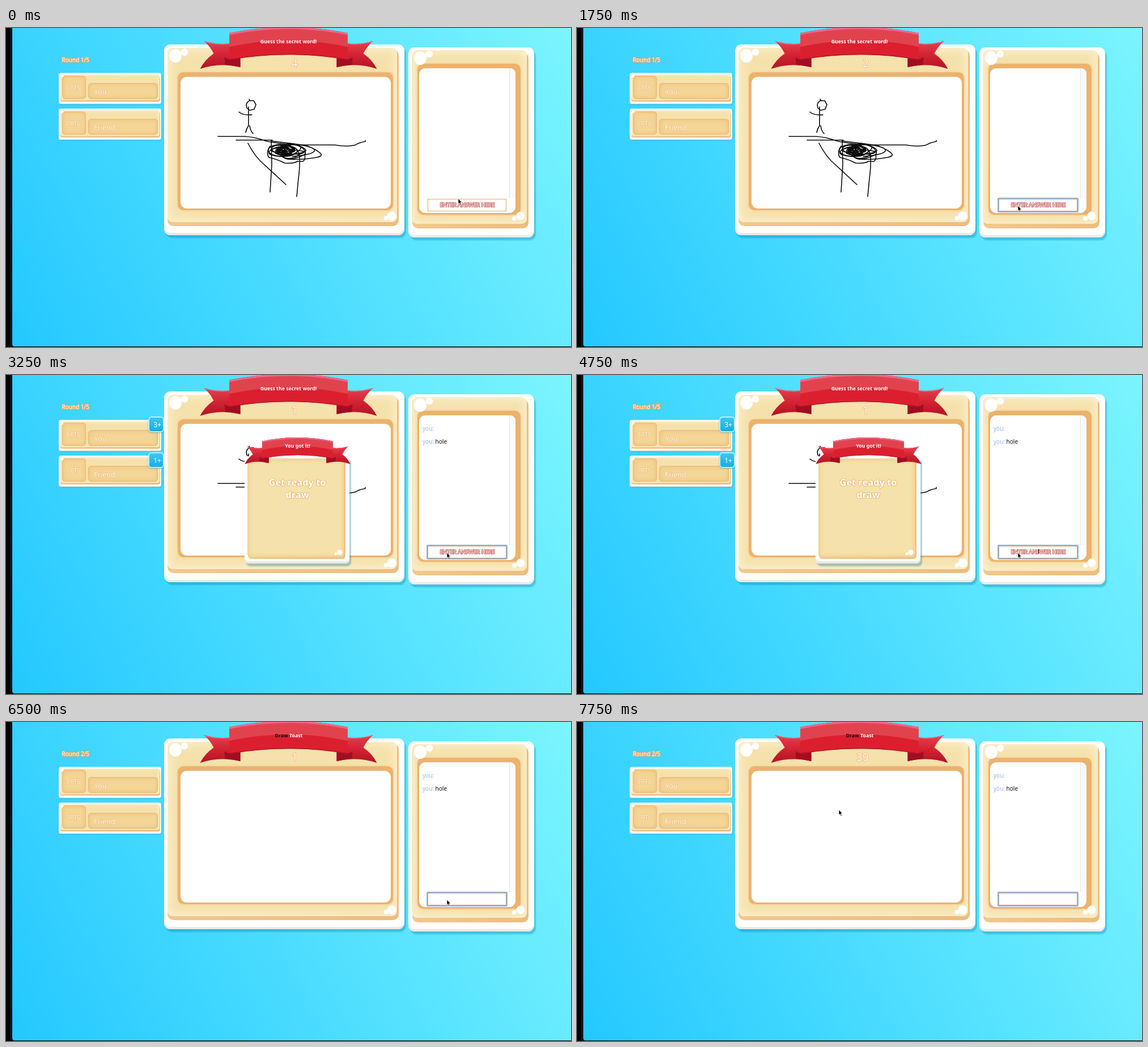
An HTML page for the animation above (8000 ms loop, 997 by 562 pixels).

```html
<!DOCTYPE html>
<html lang="en">
<head>
<meta charset="utf-8">
<title>Drawing game</title>
<style>
html, body { margin: 0; width: 100%; height: 100%; overflow: hidden; }
#stage { position: relative; width: 997px; height: 562px; overflow: hidden; background: #050505; }
#stage div, #stage svg { position: absolute; box-sizing: border-box; }
svg { inset: 0; width: 997px; height: 562px; }
.sky { left: 11px; top: 0; width: 986px; height: 561px; border-radius: 0 0 0 4px;
  background: linear-gradient(62deg, #24c8ff, #50dfff 50%, #7bf5ff); }
.edge { left: 8px; top: 0; width: 2px; height: 561px; background: #1d1d1d; }
.panel { background: #fff; border-radius: 11px;
  box-shadow: inset 0 -4px 0 #eae9e6, 3px 5px 2px #0a78a055; }
.base { background: linear-gradient(90deg, #f1c88d, #edbd7e); border-radius: 10px; }
.face { background: #f5e1ab; border-radius: 9px; box-shadow: inset 0 0 16px 4px #fbf0d0; }
.frame { background: #edb26c; border-radius: 10px; box-shadow: 0 0 3px #f0c78a; }
.sheet { background: #fff; border-radius: 11px; }
.card { left: 93px; width: 181px; height: 55px; background: #fff; border-radius: 4px;
  box-shadow: inset 0 -2px 0 #eeece6, 1px 1px 2px #0a78a055; }
.card .base { left: 3px; top: 6px; width: 176px; height: 45px; border-radius: 4px; }
.card .face { left: 3px; top: 3px; width: 175px; height: 45px; border-radius: 4px;
  box-shadow: inset 0 0 5px 1px #fbf0d0; }
.slot { background: #f3d596; border: 1.5px solid #ebb877; border-radius: 5px;
  box-shadow: inset 0 0 7px #eeb973; }
.scroll { left: 888px; top: 71px; width: 11px; height: 229px; background: #fafafa;
  border-left: 1px solid #e6e6e6; border-radius: 0 9px 0 0; }
.field { left: 744px; top: 300.5px; width: 139px; height: 22px; background: #fff;
  border: 1.5px solid #eda960; }
.ring { left: 744px; top: 300.5px; width: 139px; height: 22px; border: 1.5px solid #c7a078;
  box-shadow: 0 0 0 1.5px #86aedc, 0 0 3px 1px #86aedc; }
.badge { left: 251px; width: 28px; height: 28px; border-radius: 6px; border: 2px solid #b6f0ff;
  background: linear-gradient(#3cc8f3, #18aee2); box-shadow: 0 1px 2px #0a78a077; }
text { font-family: "Noto Sans", "Open Sans", sans-serif; fill: #fff; white-space: pre; }
.mid { text-anchor: middle; }
.title { font-size: 8.8px; font-weight: 700; text-anchor: middle; }
.glow { stroke: #f0ad66; stroke-width: 1.6px; paint-order: stroke; stroke-linejoin: round; }
.soft { stroke-width: 1.1px; }
.round { font-size: 10px; font-weight: 500; stroke-width: 2.2px; stroke: #f5a55c; }
.pts { font-size: 10.2px; text-anchor: middle; }
.name { font-size: 12.6px; }
.clock { font-size: 19px; text-anchor: end; }
.ready { font-size: 16.4px; font-weight: 600; text-anchor: middle; }
.chat { font-size: 10px; fill: #111; }
.who { fill: #8fb6e6; }
.hint { font-size: 9.6px; text-anchor: middle; stroke: #c2484c; stroke-width: 1.5px; paint-order: stroke; }
.typed { font-size: 9.6px; text-anchor: middle; fill: #111; }
.plus { font-size: 12px; text-anchor: middle; }
.ink { fill: none; stroke: #0a0a0a; stroke-width: 1.6; stroke-linecap: round; stroke-linejoin: round; }
</style>
</head>
<body>
<div id="stage">
  <div class="edge"></div>
  <div class="sky"></div>

  <div class="card" style="top:79px">
    <div class="base"></div><div class="face"></div>
    <div class="slot" style="left:6px;top:5px;width:42px;height:41px"></div>
    <div class="slot" style="left:52px;top:18px;width:123px;height:28px"></div>
  </div>
  <div class="card" style="top:142px">
    <div class="base"></div><div class="face"></div>
    <div class="slot" style="left:6px;top:5px;width:42px;height:41px"></div>
    <div class="slot" style="left:52px;top:18px;width:123px;height:28px"></div>
  </div>
  <div class="badge" style="top:73px" data-on="3250-5750"></div>
  <div class="badge" style="top:136px" data-on="3250-5750"></div>

  <div class="panel" style="left:279px;top:29px;width:424px;height:336px"></div>
  <div class="base" style="left:285px;top:38px;width:408px;height:311px"></div>
  <div class="face" style="left:285px;top:35px;width:405px;height:307px"></div>
  <div class="frame" style="left:303px;top:78px;width:380px;height:243px"></div>
  <div class="sheet" style="left:307.5px;top:86px;width:371px;height:232px"></div>

  <div class="panel" style="left:710px;top:34px;width:222px;height:335px"></div>
  <div class="base" style="left:717px;top:43px;width:205px;height:310px"></div>
  <div class="face" style="left:716px;top:39px;width:203px;height:306px"></div>
  <div class="frame" style="left:726px;top:62.5px;width:182px;height:266.5px"></div>
  <div class="sheet" style="left:729px;top:71px;width:170px;height:255px"></div>
  <div class="scroll"></div>
  <div class="field"></div>
  <div class="ring" data-on="1250-8000"></div>

  <svg viewBox="0 0 997 562">
    <defs>
      <linearGradient id="tail" x2="0" y2="1">
        <stop offset="0" stop-color="#e5404f"/>
        <stop offset=".5" stop-color="#d32333"/>
        <stop offset="1" stop-color="#b01425"/>
      </linearGradient>
      <g id="side">
        <path fill="url(#tail)" d="M-149 23Q-126 30-103 27V53H-85V69Q-122 60-156 72Q-148 56-132 45Q-138 33-149 23Z"/>
        <path fill="none" stroke="#ee6480" stroke-width="1.5" d="M-149 23.5Q-126 30.5-103 27.5"/>
        <path fill="#a10e21" d="M-113 51Q-109 55-104 55L-85 52V69Q-98 66-112 65Z"/>
      </g>
      <g id="ribbon">
        <use href="#side"/>
        <use href="#side" transform="scale(-1 1)"/>
        <path fill="#dc1f2f" d="M-104.500 9Q0-12 104.500 9V56Q0 38-104.500 56Z"/>
        <path fill="#e1434e" d="M-104.500 9Q0-12 104.500 9V33Q0 11-104.500 33Z"/>
        <path fill="none" stroke="#f0668c" stroke-width="3.500" d="M-104.500 10.500Q0-10.500 104.500 10.500"/>
        <path fill="none" stroke="#b81526" stroke-width="1.500" d="M-104.500 55.500Q0 37.500 104.500 55.500"/>
      </g>
    </defs>

    <g fill="#fff">
      <ellipse cx="299" cy="49" rx="11" ry="12"/><circle cx="315" cy="42.500" r="6.200"/>
      <circle cx="680.500" cy="331" r="8"/><circle cx="670.500" cy="335" r="4"/>
      <ellipse cx="731" cy="53" rx="11" ry="12"/><circle cx="747" cy="46" r="6.200"/>
      <circle cx="908" cy="331" r="7.500"/><circle cx="897" cy="335.500" r="4"/>
      <circle cx="98" cy="84" r="3.500"/><circle cx="98" cy="147" r="3.500"/>
    </g>

    <g class="ink" data-on="0-6500">
      <path d="M429 125.500l2 3M425 132l4-4h8l4 7-3 8-8 2-5-4-1-6 2-4"/>
      <path d="M428 139V172Q424 178 423 184M430 172Q431 181 436 186M411 148Q418 154 434 153"/>
      <path d="M374 191H421Q440 192 458 199Q480 204 515 206H580Q603 210 617 206Q622 202 634 200V198M406 197.500H470"/>
      <path d="M427 203Q440 228 455 240L494 276M468 198L469 240 466 289M518 222Q519 245 516 265L513 297"/>
      <path d="M468 199Q500 203 530 207Q550 215 556 222Q558 226 548 228Q520 233 500 231M518 206Q547 210 544 217Q538 224 505 226"/>
      <path d="M466 208Q458 220 464 228Q478 231 492 238Q508 239 514 235H524Q529 231 527 223"/>
      <path id="scribble"/>
    </g>

    <use href="#ribbon" x="498.500"/>
    <text class="title" x="498.500" y="26.500" data-on="0-6500">Guess the secret word!</text>
    <text class="title" x="499" y="26.500" data-on="6500-8000"><tspan fill="#111">Draw</tspan> Toast</text>

    <g class="clock glow">
      <text x="514.500" y="69" data-on="0-750">4</text>
      <text x="514.500" y="69" data-on="750-1750">3</text>
      <text x="514.500" y="69" data-on="1750-2750">2</text>
      <text x="514.500" y="69" data-on="2750-7500">1</text>
      <text x="514.500" y="69" data-on="7500-8000">39</text>
    </g>

    <text class="glow round" x="98.500" y="60" data-on="0-6500">Round 1/5</text>
    <text class="glow round" x="98.500" y="60" data-on="6500-8000">Round 2/5</text>
    <g class="glow soft">
      <text class="pts" x="118" y="109" data-on="0-3250">0 PTS</text>
      <text class="pts" x="118" y="109" data-on="3250-8000">3 PTS</text>
      <text class="pts" x="118" y="172" data-on="0-3250">0 PTS</text>
      <text class="pts" x="118" y="172" data-on="3250-8000">1 PTS</text>
      <text class="name" x="155.500" y="117">You</text>
      <text class="name" x="155" y="180">Friend</text>
    </g>
    <g class="plus" data-on="3250-5750">
      <text x="267" y="91.500">3+</text>
      <text x="267" y="154.500">1+</text>
    </g>

    <g data-on="3250-8000">
      <text class="chat" x="735" y="97.500"><tspan class="who">you:</tspan></text>
      <text class="chat" x="735" y="120.500"><tspan class="who">you:</tspan> hole</text>
    </g>
    <text class="hint" x="814" y="314.500" data-on="0-2000 2750-6500">ENTER ANSWER HERE</text>
    <text class="typed" x="814" y="314.500" data-on="2000-2250">h</text>
    <text class="typed" x="814" y="314.500" data-on="2250-2500">ho</text>
    <text class="typed" x="814" y="314.500" data-on="2500-2750">hole</text>
    <path fill="#111" d="M814 307h1v8h-1z" data-on="1250-1750 2750-3250 3750-4250 4750-5250 5750-6250"/>
  </svg>

  <div data-on="3250-6500">
    <div class="panel" style="left:421px;top:143px;width:185px;height:189px;border-radius:7px"></div>
    <div class="base" style="left:427px;top:150px;width:172px;height:174px;border-radius:6px"></div>
    <div class="face" style="left:426px;top:147px;width:171px;height:174px;border-radius:6px;box-shadow:inset 0 0 9px 1px #efc583"></div>
    <svg viewBox="0 0 997 562">
      <circle cx="589" cy="312.500" r="4.800" fill="#fff"/><circle cx="582" cy="315" r="2.500" fill="#fff"/>
      <use href="#ribbon" transform="translate(514.500 111) scale(.598 .64)"/>
      <text class="title" x="514.500" y="128">You got it!</text>
      <text class="ready glow" x="514" y="194.500">Get ready to</text>
      <text class="ready glow" x="514" y="217">draw</text>
    </svg>
  </div>

  <svg viewBox="0 0 997 562">
    <path id="cursor" fill="#050505" stroke="#fff" stroke-width=".7" d="M0 0V9.500L2 7.600 3.700 11.300 5.200 10.600 3.600 7H6.500Z"/>
  </svg>
</div>

<script>
const LOOP = 8000;
// time, x, y of each pointer stop
const stops = [
  [0, 798, 300.5], [250, 797.5, 307], [750, 791, 317], [1000, 778, 313],
  [7250, 594, 212], [7500, 498, 132], [7750, 462, 154.5]
];
const cursor = document.getElementById('cursor');
const parts = [...document.querySelectorAll('[data-on]')].map(el => ({
  el, spans: el.dataset.on.split(' ').map(s => s.split('-').map(Number))
}));

function loops(cx, cy, rx, ry, turns) {
  let d = '';
  for (let a = 0; a < turns * 2 * Math.PI; a += 0.3) {
    const x = cx + rx * (0.45 * Math.sin(0.31 * a) + (0.9 + 0.25 * Math.sin(1.3 * a)) * Math.cos(a));
    const y = cy + ry * (0.4 * Math.sin(0.23 * a) + (0.9 + 0.3 * Math.sin(0.9 * a)) * Math.sin(a));
    d += (d ? 'L' : 'M') + x.toFixed(1) + ' ' + y.toFixed(1);
  }
  return d;
}
document.getElementById('scribble').setAttribute('d',
  loops(496, 217, 21, 9.5, 9) + loops(489, 214, 13, 6, 8));

function draw() {
  const t = performance.now() % LOOP;
  for (const { el, spans } of parts) {
    el.style.display = spans.some(([a, b]) => t >= a && t < b) ? '' : 'none';
  }
  const [, x, y] = stops.filter(s => s[0] <= t).pop();
  cursor.setAttribute('transform', `translate(${x} ${y})`);
  requestAnimationFrame(draw);
}
draw();
</script>
</body>
</html>
```
